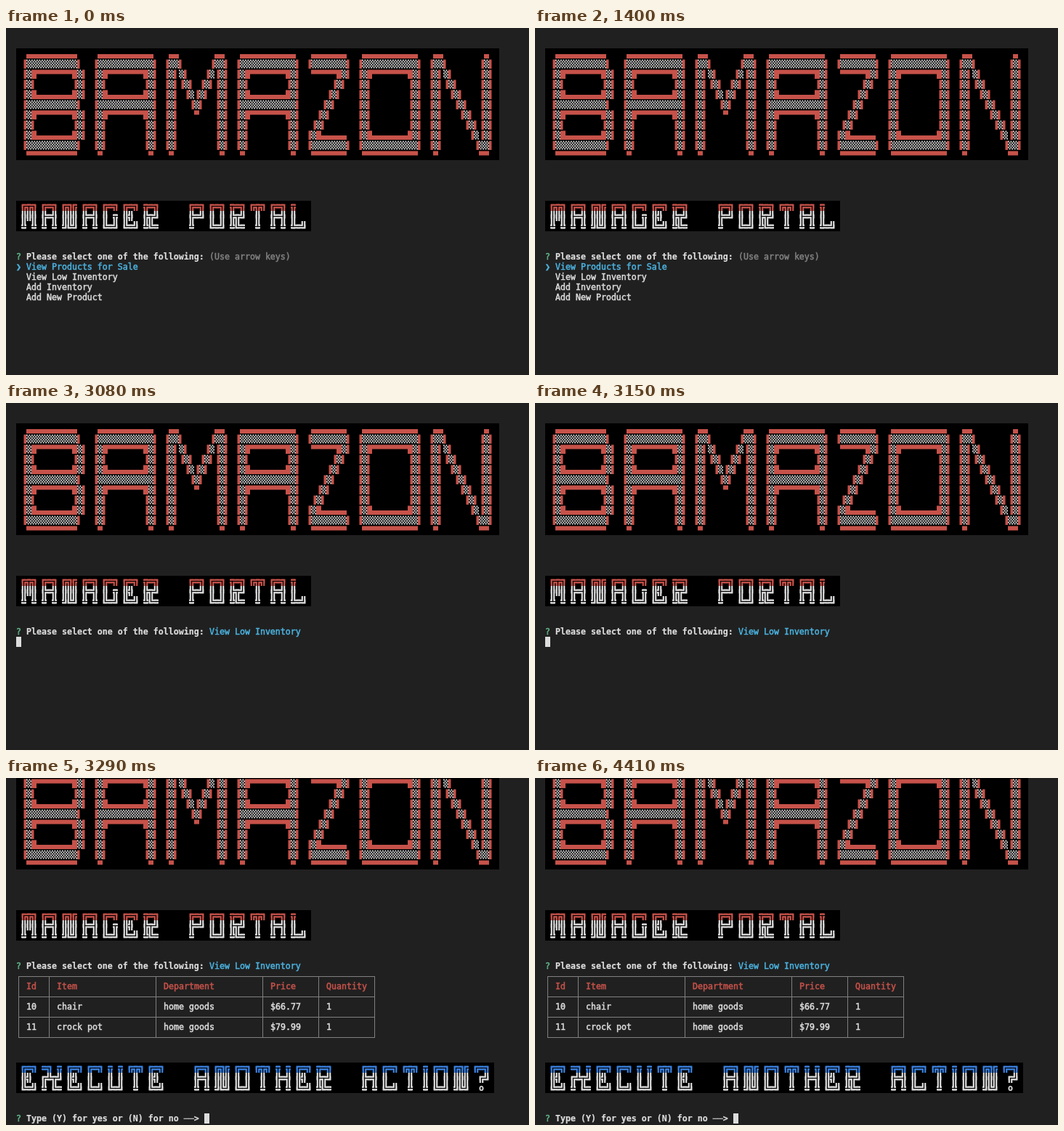
Write an HTML page with a canvas that moves like this. It is 720 px wide and 478 px high and loops after 4480 ms.

```html
<!DOCTYPE html>
<html lang="en">
<head>
<meta charset="utf-8">
<title>Manager portal</title>
<style>
html, body { margin: 0; height: 100%; overflow: hidden; background: #202020; }
canvas { display: block; }
</style>
</head>
<body>
<canvas id="stage" width="720" height="478"></canvas>
<script>
const ctx = document.getElementById('stage').getContext('2d');
const LOOP = 4480, CW = 7, CH = 14, LEFT = 14;
const SELECT_AT = 2380, ANSWER_AT = 3080, RESULT_AT = 3290;
const RED = '#c6524a', BLUE = '#3a80de', CYAN = '#4bb3e0', GREEN = '#62b98a',
      WHITE = '#dcdcdc', GREY = '#808080', BLACK = '#000';

const BIG = {
B: ` ▄▄▄▄▄▄▄▄▄▄
▐░░░░░░░░░░▌
▐░█▀▀▀▀▀▀▀█░▌
▐░▌       ▐░▌
▐░█▄▄▄▄▄▄▄█░▌
▐░░░░░░░░░░▌
▐░█▀▀▀▀▀▀▀█░▌
▐░▌       ▐░▌
▐░█▄▄▄▄▄▄▄█░▌
▐░░░░░░░░░░▌
 ▀▀▀▀▀▀▀▀▀▀`,
A: ` ▄▄▄▄▄▄▄▄▄▄▄
▐░░░░░░░░░░░▌
▐░█▀▀▀▀▀▀▀█░▌
▐░▌       ▐░▌
▐░█▄▄▄▄▄▄▄█░▌
▐░░░░░░░░░░░▌
▐░█▀▀▀▀▀▀▀█░▌
▐░▌       ▐░▌
▐░▌       ▐░▌
▐░▌       ▐░▌
 ▀         ▀`,
M: ` ▄▄       ▄▄
▐░░▌     ▐░░▌
▐░▌░▌   ▐░▐░▌
▐░▌▐░▌ ▐░▌▐░▌
▐░▌ ▐░▐░▌ ▐░▌
▐░▌  ▐░▌  ▐░▌
▐░▌   ▀   ▐░▌
▐░▌       ▐░▌
▐░▌       ▐░▌
▐░▌       ▐░▌
 ▀         ▀`,
Z: ` ▄▄▄▄▄▄▄
▐░░░░░░░▌
 ▀▀▀▀▀█░▌
     ▐░▌
    ▐░▌
   ▐░▌
  ▐░▌
 ▐░▌
▐░█▄▄▄▄▄
▐░░░░░░░▌
 ▀▀▀▀▀▀▀`,
O: ` ▄▄▄▄▄▄▄▄▄▄▄
▐░░░░░░░░░░░▌
▐░█▀▀▀▀▀▀▀█░▌
▐░▌       ▐░▌
▐░▌       ▐░▌
▐░▌       ▐░▌
▐░▌       ▐░▌
▐░▌       ▐░▌
▐░█▄▄▄▄▄▄▄█░▌
▐░░░░░░░░░░░▌
 ▀▀▀▀▀▀▀▀▀▀▀`,
N: ` ▄▄        ▄
▐░░▌      ▐░▌
▐░▌░▌     ▐░▌
▐░▌▐░▌    ▐░▌
▐░▌ ▐░▌   ▐░▌
▐░▌  ▐░▌  ▐░▌
▐░▌   ▐░▌ ▐░▌
▐░▌    ▐░▌▐░▌
▐░▌     ▐░▐░▌
▐░▌      ▐░░▌
 ▀        ▀▀`
};

const SMALL = {
  A: '╔═╗|╠═╣|╩ ╩', C: '╔═╗|║  |╚═╝', E: '╔═╗|║╣ |╚═╝', G: '╔═╗|║ ╦|╚═╝',
  H: '╦ ╦|╠═╣|╩ ╩', I: '╦|║|╩', L: '╦  |║  |╩═╝', M: '╔╦╗|║║║|╩ ╩',
  N: '╔╗╔|║║║|╝╚╝', O: '╔═╗|║ ║|╚═╝', P: '╔═╗|╠═╝|╩  ', R: '╦═╗|╠╦╝|╩╚═',
  T: '╔╦╗| ║ | ╩ ', U: '╦ ╦|║ ║|╚═╝', X: '═╗ ╦|╔╩╦╝|╩ ╚═',
  '?': '╔═╗| ╔╝| o ', ' ': '    |    |    '
};

// Which sides of its cell each double-line character reaches
const ARMS = { '═': 'LR', '║': 'UD', '╔': 'RD', '╗': 'LD', '╚': 'RU', '╝': 'LU',
  '╠': 'UDR', '╣': 'UDL', '╦': 'LRD', '╩': 'LRU' };

// Part of a cell each block character fills: x, y, width, height
const BLOCKS = { '▄': [0, 8, 7, 6], '▀': [0, 1.5, 7, 6], '█': [0, 1.5, 7, 12.5],
  '▐': [3.5, 1.5, 3.5, 12.5], '▌': [0, 1.5, 3.5, 12.5] };

function rect(color, x, y, w, h) {
  ctx.fillStyle = color;
  ctx.fillRect(x, y, w, h);
}

function text(str, col, y, color = WHITE, bold = false) {
  ctx.font = `${bold ? 'bold ' : ''}11.627px "DejaVu Sans Mono", monospace`;
  ctx.fillStyle = ctx.strokeStyle = color;
  ctx.lineWidth = bold ? 0.2 : 0.5;
  const x = LEFT + col * CW;
  ctx.fillText(str, x, y + 11);
  ctx.strokeText(str, x, y + 11);
}

function shade(x, y) {
  for (let r = 0; r < 6; r++)
    for (let c = 0; c < 2; c++)
      rect(WHITE, x + c * 3.5 + r % 2 * 1.75, y + 1.5 + r * 2, 1.75, 2);
}

// A wide band with a narrow black one inside leaves two parallel lines
function doubleLine(arms, x, y, color) {
  const cx = x + 3.5, cy = y + 7.5;
  for (const [half, paint] of [[2.8, color], [0.6, BLACK]])
    for (const arm of arms) {
      if (arm === 'L') rect(paint, x, cy - half, cx + half - x, half * 2);
      if (arm === 'R') rect(paint, cx - half, cy - half, x + CW - cx + half, half * 2);
      if (arm === 'U') rect(paint, cx - half, y, half * 2, cy + half - y);
      if (arm === 'D') rect(paint, cx - half, cy - half, half * 2, y + CH - cy + half);
    }
}

// Calls put(char, x, y, row) for every cell of a word
function eachCell(word, glyphs, sep, widthRow, y, put) {
  let col = 1;
  for (const letter of word) {
    const rows = glyphs[letter].split(sep);
    rows.forEach((line, r) => [...line].forEach((ch, c) =>
      put(ch, LEFT + (col + c) * CW, y + r * CH, r)));
    col += rows[widthRow].length + 1;
  }
}

function bigBanner(y) {
  rect(BLACK, LEFT, y, 95 * CW, 11 * CH);
  eachCell('BAMAZON', BIG, '\n', 2, y, (ch, x, cy) => {
    if (ch === '░') return shade(x, cy);
    const b = BLOCKS[ch];
    if (b) rect(RED, x + b[0], cy + b[1], b[2], b[3]);
  });
}

function smallBanner(word, cols, y, topColor) {
  rect(BLACK, LEFT, y, cols * CW, 3 * CH);
  eachCell(word, SMALL, '|', 0, y, (ch, x, cy, row) => {
    if (ARMS[ch]) doubleLine(ARMS[ch], x, cy, row ? WHITE : topColor);
    else if (ch === 'o') text(ch, (x - LEFT) / CW, cy, WHITE, true);
  });
}

function prompt(str, y) {
  text('?', 0, y, GREEN);
  text(str, 2, y, WHITE, true);
}

function cursor(col, y) {
  rect(WHITE, LEFT + col * CW, y, CW, CH);
}

function menu(selected, y) {
  ['View Products for Sale', 'View Low Inventory', 'Add Inventory', 'Add New Product']
    .forEach((item, i) => {
      const on = i === selected, rowY = y + i * CH;
      if (on) text('❯', 0, rowY, CYAN);
      text(item, 2, rowY, on ? CYAN : WHITE);
    });
}

function table(y) {
  const cols = [0, 6, 27, 48, 59, 70], top = y + 7, left = LEFT + 3;
  const rows = [
    ['Id', 'Item', 'Department', 'Price', 'Quantity'],
    ['10', 'chair', 'home goods', '$66.77', '1'],
    ['11', 'crock pot', 'home goods', '$79.99', '1']
  ];
  for (const c of cols) rect(GREY, left + c * CW, top, 1, 85);
  for (let r = 0; r < 4; r++) rect(GREY, left, top + r * 28, 491, 1);
  rows.forEach((row, r) => row.forEach((cell, c) =>
    text(cell, cols[c] + 2, y + CH + r * 28, r ? WHITE : RED)));
}

function draw(t) {
  const done = t >= RESULT_AT, answered = t >= ANSWER_AT, moved = t >= SELECT_AT;
  const scroll = done ? 4 * CH : 0;
  rect('#202020', 0, 0, 720, 478);
  bigBanner(28 - scroll);
  smallBanner('MANAGER PORTAL', 58, 238 - scroll, RED);
  prompt('Please select one of the following:', 308 - scroll);
  if (answered) text('View Low Inventory', 38, 308 - scroll, CYAN);
  else {
    if (!moved) text('(Use arrow keys)', 38, 308, GREY);
    menu(moved ? 1 : 0, 322);
  }
  if (done) {
    table(266);
    smallBanner('EXECUTE ANOTHER ACTION?', 94, 392, BLUE);
    prompt('Type (Y) for yes or (N) for no ──>', 462);
    cursor(37, 462);
  } else if (answered) cursor(0, 322);
}

const start = performance.now();
function tick() {
  draw((performance.now() - start) % LOOP);
  requestAnimationFrame(tick);
}
tick();
</script>
</body>
</html>
```
